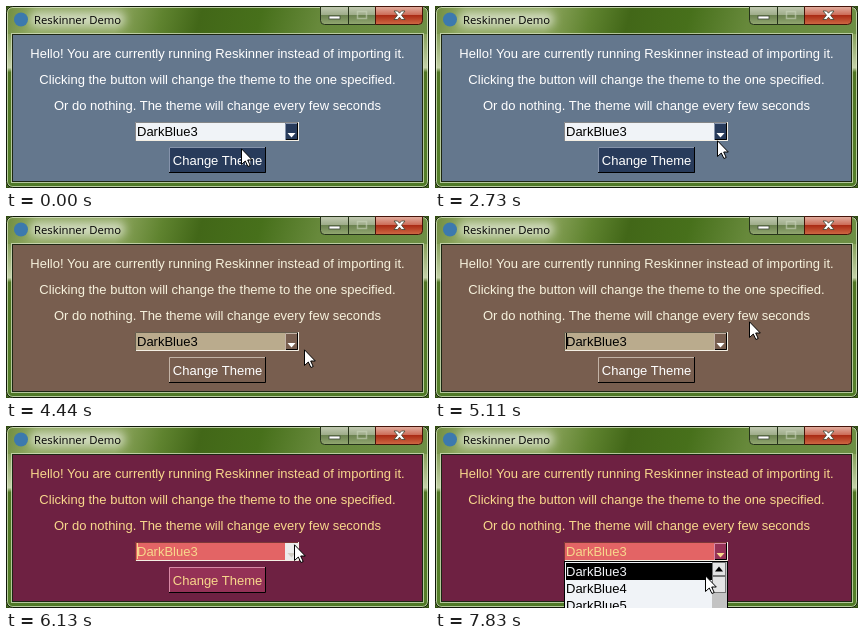
These frames come from a looping animation (423x182 px, 8 s). An HTML page:

```html
<!DOCTYPE html>
<html lang="en">
<head>
<meta charset="utf-8">
<title>Reskinner Demo</title>
<style>
  html, body { margin: 0; height: 100%; overflow: hidden; background: #2f4a10; }
  svg { display: block; width: 423px; height: 182px; font: 13px "Liberation Sans", Arial, sans-serif; }
  text { white-space: pre; }
  .blue   { --bg: #64778d; --fg: #fff;    --field: #f0f3f7; --ink: #000;    --button: #283b5b; --label: #fff;    --light: #8593ab; }
  .brown  { --bg: #785e4f; --fg: #f6f1dc; --field: #baab8d; --ink: #000;    --button: #785e4f; --label: #fff;    --light: #c3b3a6; }
  .purple { --bg: #6e2142; --fg: #f8d78c; --field: #e36465; --ink: #f8d78c; --button: #943156; --label: #f8d78c; --light: #d98aa6; }
  .bg { fill: var(--bg); }
  .fg { fill: var(--fg); }
  .field { fill: var(--field); }
  .ink { fill: var(--ink); }
  .button { fill: var(--button); }
  .label { fill: var(--label); }
  .lit { fill: none; stroke: var(--light); }
  .dark { fill: none; stroke: #000; }
  .centered { text-anchor: middle; }
</style>
</head>
<body>
<svg id="stage" class="blue" viewBox="0 0 423 182">
  <defs>
    <linearGradient id="glass" y2=".12">
      <stop offset="0" stop-color="#6f8c40"/>
      <stop offset=".07" stop-color="#8fa761"/>
      <stop offset=".27" stop-color="#8ba45c"/>
      <stop offset=".37" stop-color="#5f832f"/>
      <stop offset=".46" stop-color="#426718"/>
      <stop offset=".6" stop-color="#47701b"/>
      <stop offset=".74" stop-color="#67893b"/>
      <stop offset="1" stop-color="#6d8f45"/>
    </linearGradient>
    <linearGradient id="side" x2="0" y2="1">
      <stop offset="0" stop-color="#86a05a"/>
      <stop offset=".22" stop-color="#c3d0a8"/>
      <stop offset=".25" stop-color="#4f7423"/>
      <stop offset="1" stop-color="#55802a"/>
    </linearGradient>
    <linearGradient id="caption" x2="0" y2="1">
      <stop offset="0" stop-color="#c3ccb4"/>
      <stop offset=".48" stop-color="#9dab88"/>
      <stop offset=".5" stop-color="#6c8250"/>
      <stop offset="1" stop-color="#93a872"/>
    </linearGradient>
    <linearGradient id="close" x2="0" y2="1">
      <stop offset="0" stop-color="#e3b0a2"/>
      <stop offset=".48" stop-color="#cc6a55"/>
      <stop offset=".5" stop-color="#ab2c15"/>
      <stop offset="1" stop-color="#cf6a45"/>
    </linearGradient>
    <filter id="blur" x="-20%" y="-60%" width="140%" height="220%"><feGaussianBlur stdDeviation="5"/></filter>
  </defs>

  <!-- window frame -->
  <rect width="423" height="182" rx="6" fill="url(#glass)"/>
  <path d="M1 28H6V181H1Z M417 28H422V181H417Z" fill="url(#side)"/>
  <path d="M1 176H422V181H1Z" fill="#4f7926"/>
  <rect x="1.5" y="1.5" width="420" height="179" rx="5" fill="none" stroke="#e6f0d2" stroke-opacity=".7"/>
  <rect x=".5" y=".5" width="422" height="181" rx="6" fill="none" stroke="#10180a"/>
  <rect x="24" y="6" width="95" height="15" rx="7" fill="#fff" opacity=".6" filter="url(#blur)"/>
  <circle cx="15" cy="13.5" r="7" fill="#3c79ae"/>
  <text x="28" y="18" font-family="Open Sans, Noto Sans, sans-serif" font-size="11.3">Reskinner Demo</text>

  <!-- caption buttons -->
  <g stroke="#26331a">
    <path d="M314.5 .5H342.5V18.5H318.5Q314.5 18.5 314.5 14.5Z M342.5 .5H369.5V18.5H342.5Z" fill="url(#caption)"/>
    <path d="M369.5 .5H416.5V14.5Q416.5 18.5 412.500 18.5H369.5Z" fill="url(#close)" stroke="#451409"/>
  </g>
  <g fill="#fff" stroke="#3a4432" stroke-width=".8">
    <rect x="323" y="10" width="11" height="3"/>
    <path d="M351.5 5.500H360.500V12.500H351.500Z" fill="none" stroke="#c9d3ba" stroke-width="1.500" opacity=".6"/>
    <path d="M388 5H391.500L393.500 7.200 395.500 5H399L395.500 9.200 399 13.500H395.500L393.500 11.200 391.500 13.500H388L391.500 9.200Z"/>
  </g>

  <!-- client area -->
  <rect x="5.5" y="27.5" width="412" height="149" fill="none" stroke="#d5e0c0" stroke-opacity=".75"/>
  <rect class="bg" x="6.5" y="28.5" width="410" height="147" stroke="#1c2612"/>
  <g class="fg centered">
    <text x="211.5" y="52">Hello! You are currently running Reskinner instead of importing it.</text>
    <text x="211.5" y="78">Clicking the button will change the theme to the one specified.</text>
    <text x="211.5" y="104">Or do nothing. The theme will change every few seconds</text>
  </g>

  <!-- combo box -->
  <rect class="field" x="129" y="116" width="164" height="19"/>
  <path class="dark" d="M129.5 135V116.5H293" stroke-opacity=".45"/>
  <path d="M130 134.5H292.5V116" fill="none" stroke="#f4efe4"/>
  <text class="ink" x="131" y="130">DarkBlue3</text>
  <rect id="caret" class="ink" x="131" y="117" width="1" height="16"/>
  <rect class="button" x="279" y="117" width="13" height="17"/>
  <path class="lit" d="M279.5 134V117.5H292"/>
  <path class="dark" d="M280 133.5H291.5V117"/>
  <path class="label" d="M281.5 127H289.5L285.5 131.5Z"/>
  <g id="hover">
    <rect x="279" y="117" width="13" height="17" fill="#ececec"/>
    <path d="M281.5 127H289.5L285.5 131.5Z" fill="#d0cdc4"/>
  </g>

  <!-- push button -->
  <rect class="button" x="163" y="141" width="97" height="26"/>
  <path class="lit" d="M163.5 167V141.5H260"/>
  <path class="dark" d="M163 166.5H259.5V141"/>
  <text class="label centered" x="211.5" y="159">Change Theme</text>

  <!-- drop-down list -->
  <g id="list">
    <rect x="129.5" y="135.5" width="163" height="50" fill="#f0f3f7" stroke="#000"/>
    <rect x="131" y="137" width="146" height="17"/>
    <text x="131" y="150" fill="#f0f3f7">DarkBlue3</text>
    <text x="131" y="167">DarkBlue4</text>
    <text x="131" y="184">DarkBlue5</text>
    <rect x="277" y="136" width="15" height="46" fill="#c3c3c3"/>
    <g fill="#e4e4e4" stroke="#777">
      <rect x="277.5" y="136.5" width="13" height="13"/>
      <rect x="277.5" y="150.5" width="13" height="16"/>
    </g>
    <path d="M280 145.5H288L284 140.5Z"/>
  </g>

  <path id="arrow" d="M.5 .8V16.5L4.3 13 6.9 18.5 9.2 17.5 6.7 12H11.3Z" fill="#fff" stroke="#000"/>
  <path id="beam" d="M0 .5H3M4 .5H7M3.5 1V16M0 16.5H3M4 16.5H7" fill="none" stroke="#000"/>
</svg>
<script>
const LOOP = 8000;
const THEMES = [[0, "blue"], [3070, "brown"], [6130, "purple"]];
const CARET_OFF = [[0, 340], [1020, 1350], [1700, 2040], [2730, 3070], [3760, 4100], [4440, 4780], [5450, 5790], [6470, LOOP]];

// Pointer steps: start time, x, y, shape
const POINTER = [
  [0, 235, 142, "arrow"], [1020, 256, 121, "beam"], [1350, 268, 117, "beam"], [2380, 272, 117, "beam"],
  [2730, 282, 134, "arrow"], [3070, 289, 137, "arrow"], [3410, 298, 138, "arrow"], [4440, 298, 133, "arrow"],
  [4780, 310, 107, "arrow"], [5110, 314, 105, "arrow"], [5450, 284, 114, "arrow"], [5790, 288, 108, "arrow"],
  [6130, 288, 118, "arrow"], [7160, 235, 126, "arrow"], [7490, 238, 143, "arrow"], [7830, 270, 149, "arrow"]
];

const byId = id => document.getElementById(id);
const latest = (steps, t) => steps.findLast(step => step[0] <= t);
const within = (t, from, to) => t >= from && t < to;
const show = (id, on) => byId(id).setAttribute("visibility", on ? "visible" : "hidden");

function draw(t) {
  byId("stage").setAttribute("class", latest(THEMES, t)[1]);
  show("caret", !CARET_OFF.some(span => within(t, ...span)));
  show("hover", within(t, 6130, 6470));
  show("list", t >= 6470);

  const [, x, y, shape] = latest(POINTER, t);
  for (const id of ["arrow", "beam"]) show(id, id === shape);
  byId(shape).setAttribute("transform", `translate(${x} ${y})`);
}

function tick() {
  draw(performance.now() % LOOP);
  requestAnimationFrame(tick);
}
tick();
</script>
</body>
</html>
```
